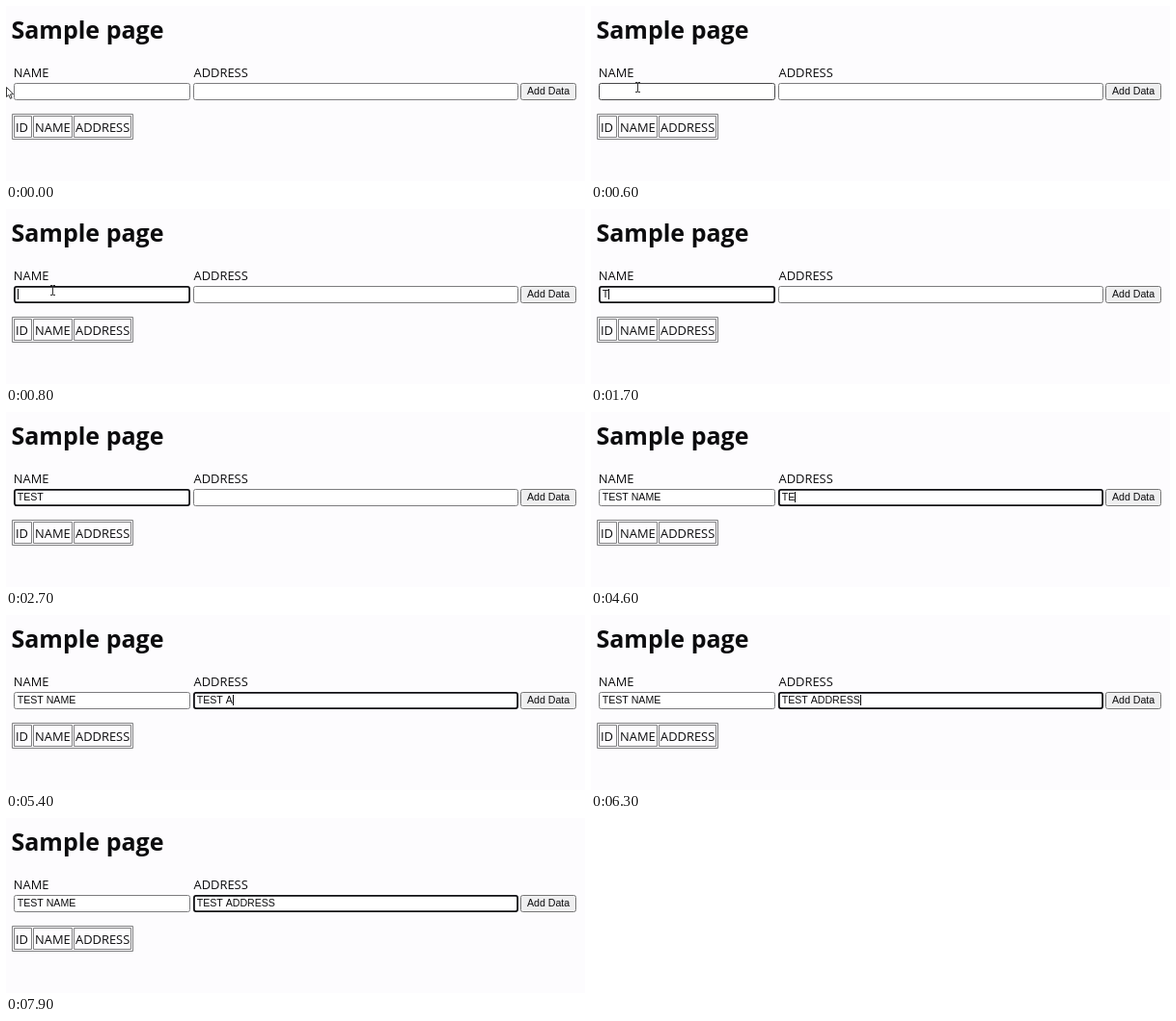
These frames come from a looping animation (600x182 px, 8000 ms). An HTML page with a canvas:

```html
<!DOCTYPE html>
<html lang="en">
<head>
<meta charset="utf-8">
<title>Sample page</title>
<style>
  html, body { margin: 0; width: 100%; height: 100%; overflow: hidden; background: #fdfcfe; }
  canvas { display: block; width: 600px; height: 182px; }
</style>
</head>
<body>
<canvas id="stage"></canvas>
<script>
const LOOP = 8000;
const canvas = document.getElementById("stage");
const ctx = canvas.getContext("2d");
const ratio = window.devicePixelRatio || 1;
canvas.width = 600 * ratio;
canvas.height = 182 * ratio;

const INK = "#0c0c0e";
const HEADING = "bold 25px 'Open Sans', 'Noto Sans', sans-serif";
const LABEL = "12.9px 'Open Sans', 'Noto Sans', sans-serif";
const FIELD = "10.6px 'Liberation Sans', Arial, sans-serif";

// Key times in ms, one per typed character
const nameField = {
  x: 8, w: 183, text: "TEST NAME", focus: 700, blur: 3300, hover: [200, 700],
  keys: [1700, 1800, 1900, 2000, 2100, 2800, 2900, 3000, 3200],
  caret: [[700, 1200], [1700, 2700], [2800, 3300]]
};
const addressField = {
  x: 194, w: 337, text: "TEST ADDRESS", focus: 3300, blur: LOOP, hover: [0, 0],
  keys: [4500, 4600, 4700, 4800, 4900, 5400, 5500, 5700, 5900, 5900, 6100, 6300],
  caret: [[3300, 3800], [4300, 6800], [7400, 7900]]
};

const within = (t, [from, to]) => t >= from && t < to;

function text(str, x, y, font) {
  ctx.font = font;
  ctx.fillStyle = INK;
  ctx.fillText(str, x, y);
}

function box(x, y, w, h, { line = 1, color = "#767676", fill, radius = 2 } = {}) {
  ctx.beginPath();
  ctx.roundRect(x + line / 2, y + line / 2, w - line, h - line, radius);
  if (fill) {
    ctx.fillStyle = fill;
    ctx.fill();
  }
  ctx.lineWidth = line;
  ctx.strokeStyle = color;
  ctx.stroke();
}

function drawField(field, t) {
  if (within(t, [field.focus, field.blur])) {
    box(field.x, 80, field.w, 18, { line: 1.8, color: "#101014", fill: "#fff" });
  } else {
    const color = within(t, field.hover) ? "#48484a" : "#7c7c7e";
    box(field.x, 80, field.w, 18, { color, fill: "#fff" });
  }
  const typed = field.text.slice(0, field.keys.filter(k => k <= t).length);
  const x = field.x + 3.7;
  text(typed, x, 92, FIELD);
  if (field.caret.some(span => within(t, span))) {
    ctx.fillRect(Math.round(x + ctx.measureText(typed).width), 83, 1, 11);
  }
}

function drawTable() {
  const style = { color: "#808082", radius: 0 };
  box(6, 112, 126, 27, style);
  [["ID", 8, 19], ["NAME", 28, 41], ["ADDRESS", 70, 60]].forEach(([label, x, w]) => {
    box(x, 114, w, 23, style);
    text(label, x + 2, 131, LABEL);
  });
}

function drawArrow(x, y) {
  const points = [[0, 0], [0, 10], [2.3, 8], [4, 11.8], [5.6, 11], [4, 7.4], [7, 7.2]];
  ctx.beginPath();
  points.forEach(([px, py]) => ctx.lineTo(x + px, y + py));
  ctx.closePath();
  ctx.fillStyle = "#fff";
  ctx.fill();
  ctx.lineWidth = 0.9;
  ctx.strokeStyle = "#222";
  ctx.stroke();
}

function drawBeam(x, y) {
  ctx.fillStyle = "#333";
  ctx.fillRect(x - 0.5, y - 5, 1, 10);
  for (const edge of [y - 5.5, y + 4.5]) {
    ctx.fillRect(x - 2.5, edge, 2, 1);
    ctx.fillRect(x + 0.5, edge, 2, 1);
  }
}

function drawPointer(t) {
  if (t >= 900) return;
  const p = Math.min(Math.floor(t / 100) / 6, 1);
  const x = 0.5 + 47 * p * (2 - p);
  if (x < 8) drawArrow(x, 84.5);
  else drawBeam(Math.round(x) + 0.5, 84.5);
}

function draw(t) {
  ctx.setTransform(ratio, 0, 0, ratio, 0, 0);
  ctx.fillStyle = "#fdfcfe";
  ctx.fillRect(0, 0, 600, 182);

  text("Sample page", 5.5, 34, HEADING);
  text("NAME", 7.8, 74, LABEL);
  text("ADDRESS", 194.5, 74, LABEL);
  drawField(nameField, t);
  drawField(addressField, t);
  box(533, 80, 58, 18, { fill: "#efeff0" });
  text("Add Data", 540, 92, FIELD);
  drawTable();
  drawPointer(t);
}

const start = performance.now();
function tick() {
  draw((performance.now() - start) % LOOP);
  requestAnimationFrame(tick);
}
tick();
</script>
</body>
</html>
```
